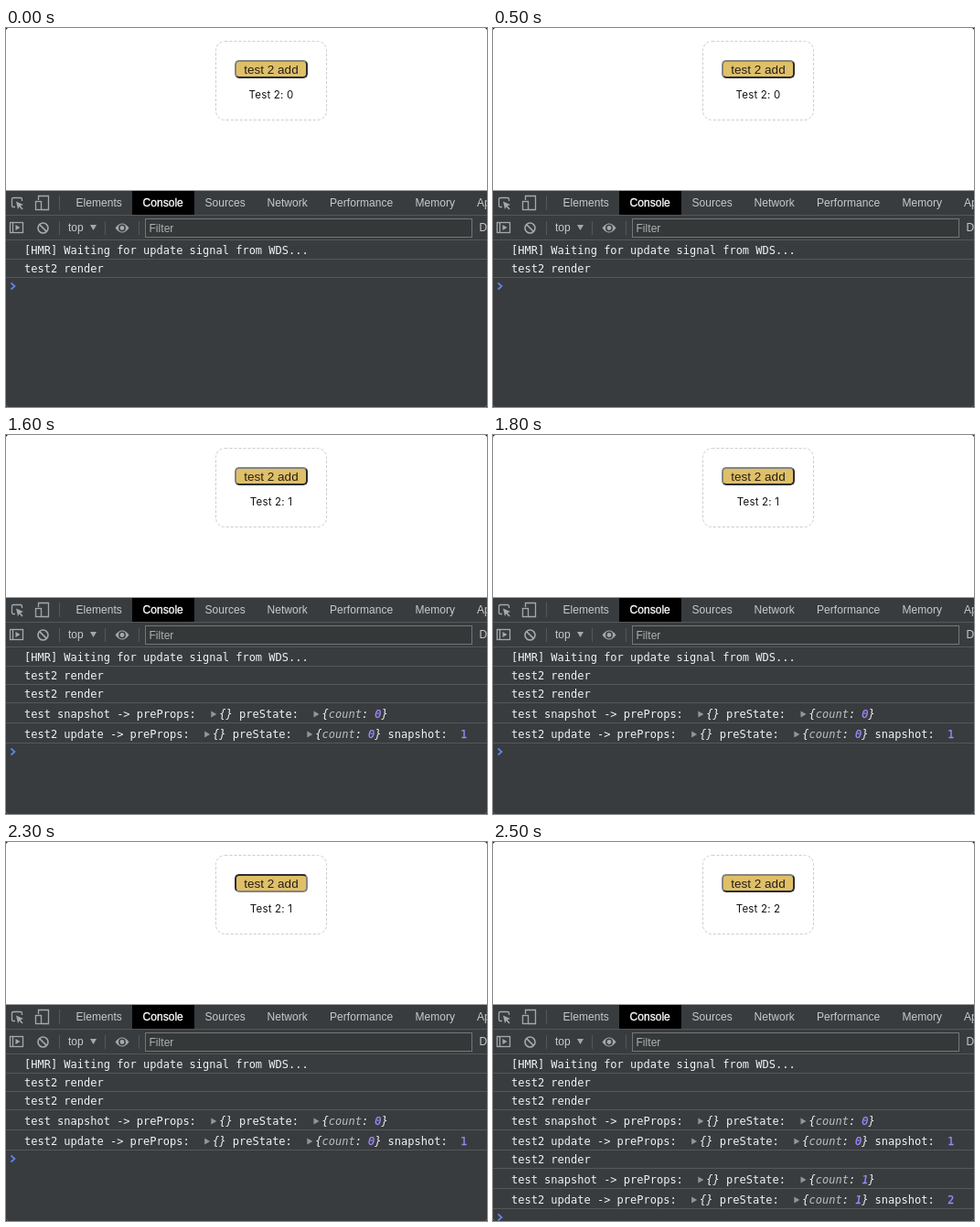
An HTML page that plays this animation: 526x414 px, repeating every 3.5 s.

```html
<!DOCTYPE html>
<html lang="en">
<head>
<meta charset="utf-8">
<title>Snapshot demo</title>
<style>
html, body { margin: 0; width: 100%; height: 100%; overflow: hidden; background: #000; }
.stage { position: relative; width: 526px; height: 414px; overflow: hidden; border-radius: 3px; background: #fff; }
svg { position: absolute; inset: 0; }
text { white-space: pre; }
.ui { font: 12px "Liberation Sans", Arial, sans-serif; letter-spacing: .04px; fill: #c8cacb; }
.ui .on { fill: #fff; stroke: #fff; stroke-width: .3; }
.ui .hint { fill: #aeb1b3; }
.count { font: 11.5px Inter, sans-serif; letter-spacing: .2px; fill: #111; text-anchor: middle; }
.log { font: 12px "DejaVu Sans Mono", monospace; fill: #f1f2f3; }
.obj { font-style: italic; }
.key { fill: #bcbfc1; }
.num { fill: #a188ff; stroke: #a188ff; stroke-width: .25; }
.icon { fill: none; stroke: #a5a8aa; stroke-width: 1.3; }
.icon .solid { fill: #a5a8aa; stroke: none; }
.add {
  position: absolute; left: 250px; top: 35px; width: 80px; height: 20px;
  box-sizing: border-box; border: 2px solid; border-radius: 5px;
  border-color: #858580 #2c2d30 #2c2d30 #858580; background: #dfc068;
  font: 13.5px/18px "Liberation Sans", Arial, sans-serif; color: #251c1c;
  text-align: center; white-space: nowrap;
}
.add, .c0, .c1, .c2, .batch1, .batch2, .prompt { animation: 3500ms step-end infinite; }
.add { animation-name: press; }
.c0 { animation-name: zero; }
.c1 { animation-name: one; }
.c2, .batch2 { animation-name: second; }
.batch1 { animation-name: first; }
.prompt { animation-name: prompt; }
@keyframes press {
  0%, 45.714%, 71.428%, 100% { border-color: #858580 #2c2d30 #2c2d30 #858580; }
  42.857%, 65.714% { border-color: #2c2d30 #858580 #858580 #2c2d30; }
}
@keyframes zero { 0% { opacity: 1; } 45.714%, 100% { opacity: 0; } }
@keyframes one { 0%, 71.428%, 100% { opacity: 0; } 45.714% { opacity: 1; } }
@keyframes first { 0% { opacity: 0; } 45.714%, 100% { opacity: 1; } }
@keyframes second { 0% { opacity: 0; } 71.428%, 100% { opacity: 1; } }
@keyframes prompt {
  0% { transform: translateY(282px); }
  45.714% { transform: translateY(346px); }
  71.428%, 100% { transform: translateY(410px); }
}
</style>
</head>
<body>
<div class="stage">
<svg width="526" height="414" viewBox="0 0 526 414">
  <rect x="229.5" y="14.5" width="121" height="86" rx="10" fill="none" stroke="#ccc" stroke-dasharray="3 2"/>
  <g class="count">
    <text class="c0" x="290" y="77">Test 2: 0</text>
    <text class="c1" x="290" y="77">Test 2: 1</text>
    <text class="c2" x="290" y="77">Test 2: 2</text>
  </g>

  <rect y="177.5" width="526" height="237" fill="#393c3e"/>
  <rect x="138" y="178" width="68" height="26" fill="#000"/>
  <path d="M0 204.5H526M0 231.5H526M58.5 183V199M58.5 211V226M108.5 211V226M145.5 211V226" stroke="#54585a"/>
  <rect x="152.5" y="208.5" width="357" height="20" fill="#353839" stroke="#74777a"/>

  <g class="ui">
    <text x="76.5" y="195">Elements</text>
    <text x="149.5" y="195" class="on">Console</text>
    <text x="217.5" y="195">Sources</text>
    <text x="285.5" y="195">Network</text>
    <text x="354" y="195">Performance</text>
    <text x="447.5" y="195">Memory</text>
    <text x="515" y="195">Application</text>
    <text x="68" y="222">top</text>
    <text x="156.5" y="223" class="hint">Filter</text>
    <text x="517.5" y="222">Default levels</text>
  </g>

  <g class="icon">
    <path d="M10 195.5H8Q6.5 195.5 6.5 194V187Q6.5 185.5 8 185.5H16Q17.5 185.5 17.5 187V189"/>
    <path d="M11 189.5L19 193L15.8 194.2L18.6 197.4L17.4 198.5L14.6 195.3L13 198Z" class="solid"/>
    <path d="M35.5 188V183.5H46.5V198.5H39"/>
    <rect x="32.5" y="189.5" width="6" height="9"/>
    <rect x="4.5" y="212.5" width="14" height="11"/>
    <path d="M7.5 212V224"/>
    <path d="M10.5 215L15.5 218L10.5 221Z" class="solid"/>
    <circle cx="40.5" cy="218.5" r="5.5" stroke-width="1.6"/>
    <path d="M36.6 214.6L44.4 222.4" stroke-width="1.6"/>
    <path d="M92 215H99L95.5 221Z" class="solid"/>
    <path d="M119.5 218.5Q127 208.5 134.5 218.5Q127 228.5 119.5 218.5Z" class="solid"/>
    <circle cx="127" cy="218.5" r="3.2" fill="#a5a8aa" stroke="#393c3e" stroke-width="1.5"/>
  </g>

  <g class="log">
    <g id="start"></g>
    <g id="batch1" class="batch1"></g>
    <g id="batch2" class="batch2"></g>
  </g>
  <path class="prompt" d="M5.5 -3.5L9.5 0L5.5 3.5" fill="none" stroke="#5f86e8" stroke-width="1.7"/>
</svg>
<div class="add">test 2 add</div>
</div>
<script>
const CH = 7.224, LEFT = 20;
let bottom = 232;

const label = (x, y, body, cls = '') => `<text class="${cls}" x="${x}" y="${y}">${body}</text>`;

const arrow = (x, y) => `<path d="M${x} ${y - 7.5}l6 3.5l-6 3.5z" fill="#92969a"/>`;

function addRow(id, height, draw) {
  bottom += height;
  document.getElementById(id).innerHTML += draw(bottom - 5) +
    `<rect y="${bottom}" width="526" height="1" fill="#54585a"/>`;
}

const plain = (id, body) => addRow(id, 20, y => label(LEFT, y, body));

// A message followed by the expandable props and state objects
function change(id, body, count, snapshot) {
  addRow(id, 22, y => {
    const x = LEFT + body.length * CH;
    let out = label(LEFT, y, body) + arrow(x + 16.5, y) + label(x + 25.5, y, '{}', 'obj') +
      label(x + 47.2, y, 'preState:') + arrow(x + 128.7, y) +
      label(x + 137.7, y, `{<tspan class="key">count</tspan>: <tspan class="num">${count}</tspan>}`, 'obj');
    if (snapshot) out += label(x + 217, y, 'snapshot:') + label(x + 296.3, y, snapshot, 'num');
    return out;
  });
}

function update(id, before) {
  plain(id, 'test2 render');
  change(id, 'test snapshot -> preProps:', before);
  change(id, 'test2 update -> preProps:', before, before + 1);
}

plain('start', '[HMR] Waiting for update signal from WDS...');
plain('start', 'test2 render');
update('batch1', 0);
update('batch2', 1);
</script>
</body>
</html>
```
